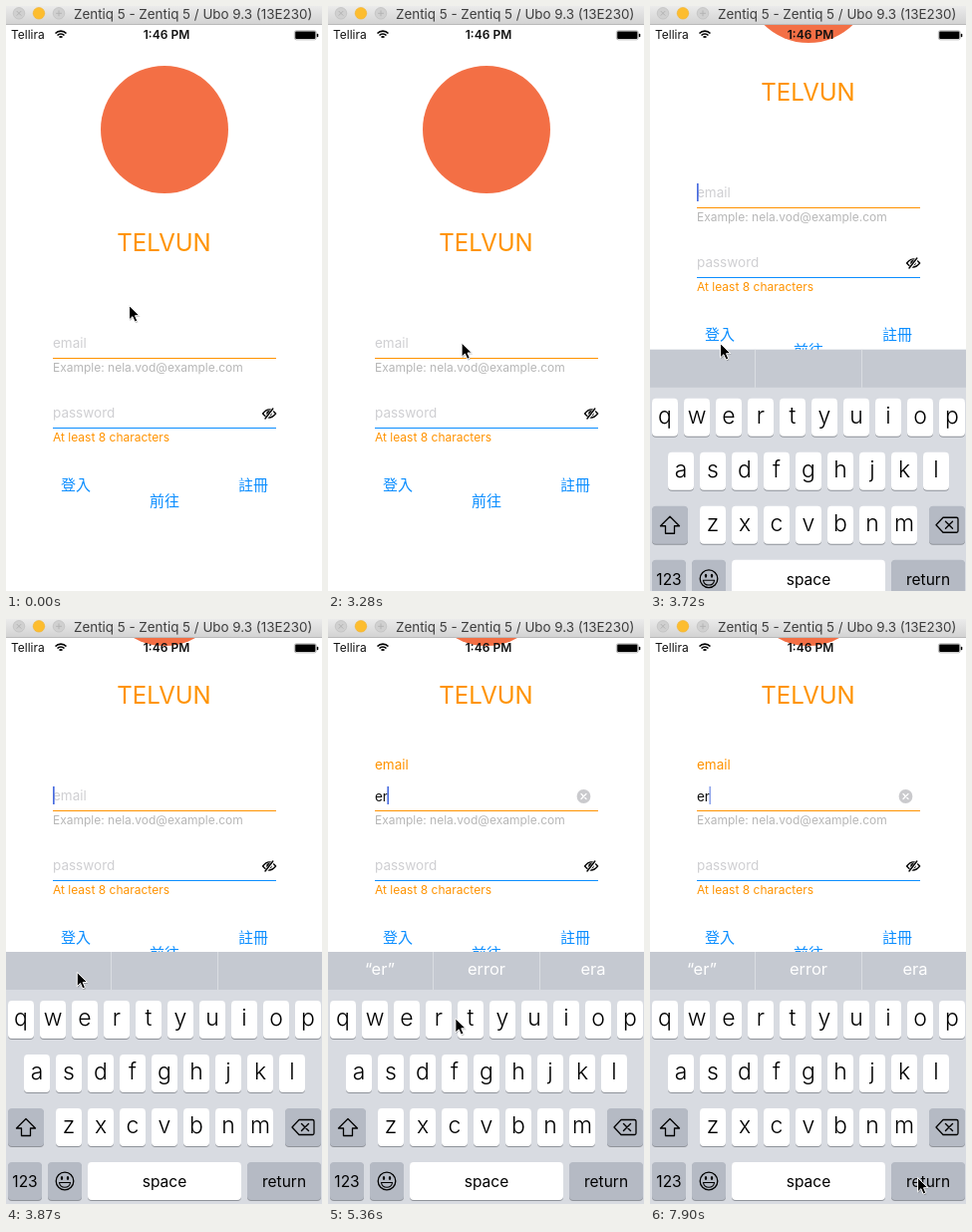
An HTML page that plays this animation: 317 px wide and 587 px high, repeating every 8000 ms.

```html
<!DOCTYPE html>
<html lang="en">
<head>
<meta charset="utf-8">
<title>Login form</title>
<style>
  html, body { margin: 0; width: 100%; height: 100%; overflow: hidden; background: #fff; }
  svg { display: block; width: 317px; height: 587px; }
  text { font-family: Inter, Roboto, sans-serif; white-space: pre; }
  .cjk { font-family: "Noto Sans CJK TC", "Noto Sans CJK JP", "Noto Sans CJK", sans-serif; }
</style>
</head>
<body>
<svg viewBox="0 0 317 587" xmlns="http://www.w3.org/2000/svg">
  <defs>
    <linearGradient id="shade" x2="0" y2="1">
      <stop stop-color="#ebebeb"/><stop offset="1" stop-color="#d3d3d3"/>
    </linearGradient>
  </defs>
  <rect width="317" height="587" fill="#fff"/>
  <g id="page"></g>
  <g id="status"></g>
  <g id="keyboard"></g>
  <g id="titlebar"></g>
  <g id="cursor">
    <path d="M.8 1V15.2L4.2 12L6.6 17.3L9 16.2L6.7 11.1H11.2Z" opacity=".22" transform="translate(.5 1)"/>
    <path d="M.6 .6V14.9L3.9 11.7L6.2 17L8.8 15.9L6.5 10.7H10.9Z" stroke="#fff"/>
  </g>
</svg>
<script>
const ORANGE = '#ff9300', BLUE = '#0c8eff', HINT = '#cfcfd2', GREY = '#b5bac4';
const $ = id => document.getElementById(id);

function add(parent, tag, attrs, text) {
  const el = document.createElementNS('http://www.w3.org/2000/svg', tag);
  for (const k in attrs) el.setAttribute(k, attrs[k]);
  if (text !== undefined) el.textContent = text;
  parent.appendChild(el);
  return el;
}
const label = (parent, x, y, size, fill, text, more) =>
  add(parent, 'text', { x, y, 'font-size': size, fill, ...more }, text);
const rect = (parent, x, y, width, height, fill, more) =>
  add(parent, 'rect', { x, y, width, height, fill, ...more });
const circle = (parent, cx, cy, r, fill, more) =>
  add(parent, 'circle', { cx, cy, r, fill, ...more });
const path = (parent, d, width = 1.3, more) =>
  add(parent, 'path', { d, fill: 'none', stroke: '#000', 'stroke-width': width, 'stroke-linejoin': 'round', 'stroke-linecap': 'round', ...more });
const cross = (parent, x, y, r, width, stroke) =>
  path(parent, `M${x - r} ${y - r}l${2 * r} ${2 * r}m0 ${-2 * r}l${-2 * r} ${2 * r}`, width, { stroke });
const mid = { 'text-anchor': 'middle' };

// Login page
const page = $('page');
circle(page, 159, 124, 64, '#f36f45');
label(page, 158.5, 246, 24, ORANGE, 'TELVUN', mid);

function field(y, hint, note, noteColor, lineColor) {
  rect(page, 47, y + 10, 224, 1, lineColor);
  label(page, 47, y + 24, 12, noteColor, note);
  return label(page, 47, y, 13.5, HINT, hint);
}
const hint = field(343, 'email', 'Example: nela.vod@example.com', '#b7b7b7', ORANGE);
field(413, 'password', 'At least 8 characters', ORANGE, BLUE);
const typed = label(page, 47, 343.5, 13.5, '#111', '');
const caret = rect(page, 47, 329, 1.7, 18, '#4a6de0');

const filled = add(page, 'g');
label(filled, 47, 312, 13.5, ORANGE, 'email');
circle(filled, 256.5, 339, 6.9, '#cacacd');
cross(filled, 256.5, 339, 2.5, 1.3, '#fff');

path(page, 'M257.6 409Q264 400.8 270.6 409Q264 417 257.6 409Z', 1.4);
circle(page, 264, 408.8, 2.7, '#000');
path(page, 'M260.4 414.2L268.4 403.8', 3, { stroke: '#fff' });
path(page, 'M260 414L267.8 404', 1.4);

const link = (x, y, text) => label(page, x, y, 15, BLUE, text, { class: 'cjk' });
link(55, 486, '登入');
link(233, 486, '註冊');
link(144, 502, '前往');

// Status bar
const status = $('status');
label(status, 5, 33.2, 12, '#111', 'Tellira');
for (const r of [7.4, 4.7, 2]) {
  const w = r * .74;
  path(status, `M${55 - w} ${33 - w}A${r} ${r} 0 0 1 ${55 + w} ${33 - w}`, 1.6, { 'stroke-linecap': 'butt' });
}
label(status, 161, 33.4, 12, '#111', '1:46 PM', { ...mid, 'font-weight': 600 });
rect(status, 289.4, 24.8, 21.8, 9, '#fff', { rx: 1.8, stroke: '#888', 'stroke-width': .6 });
rect(status, 290.2, 25.6, 20.2, 7.4, '#000', { rx: 1 });
rect(status, 311.8, 27.8, 1.5, 3.4, '#000', { rx: .7 });

// Keyboard
const board = $('keyboard');
rect(board, 0, 334, 317, 253, '#d8dbe1');
rect(board, 0, 334, 317, 38, '#c5c9d1');
for (const x of [105, 212]) rect(board, x, 334, 1, 38, '#dadde2');
const words = [52, 159, 266].map(x => label(board, x, 357, 16.5, '#fff', '', mid));

function key(x, row, w, text, fill = '#fff', more = { 'font-size': 15.5 }) {
  const y = 383 + row * 54;
  rect(board, x, y + 1, w, 38, '#8f939a', { rx: 4 });
  rect(board, x, y, w, 38, fill, { rx: 4 });
  label(board, x + w / 2, y + 25, 23, '#000', text, { ...mid, ...more });
}
['qwertyuiop', 'asdfghjkl', 'zxcvbnm'].forEach((letters, row) =>
  [...letters].forEach((c, i) =>
    key(162 + (i - letters.length / 2) * 32, row, 26, c, '#fff', { 'font-weight': 300 })));
key(2, 2, 36, '', GREY);
key(280, 2, 36, '', GREY);
key(2, 3, 34, '123', GREY);
key(42, 3, 34, '', GREY);
key(82, 3, 154, 'space');
key(242, 3, 74, 'return', GREY);
path(board, 'M20 501.5L10.5 511H15.5V518.5H24.5V511H29.5Z');
path(board, 'M287 510L294 502.5H307.5Q309 502.5 309 504V516Q309 517.5 307.5 517.5H294Z');
cross(board, 300, 510, 3.5, 1.4, '#000');
circle(board, 59, 564, 8.8, 'none', { stroke: '#000', 'stroke-width': 1.3 });
for (const cx of [56, 62]) add(board, 'ellipse', { cx, cy: 561, rx: 1.2, ry: 1.9 });
path(board, 'M53.4 565.5H64.6Q63.6 570.3 59 570.3Q54.4 570.3 53.4 565.5Z', 1.1);

// Window title bar
const bar = $('titlebar');
rect(bar, 0, 0, 317, 18, 'url(#shade)');
rect(bar, 0, 18, 317, 1, '#b9b9b9');
for (const x of [13, 33, 53]) circle(bar, x, 7.3, 5.8, x === 33 ? '#fdbd2f' : '#d0d0d0', { stroke: x === 33 ? '#f0b02e' : '#bababa', 'stroke-width': .6 });
cross(bar, 13, 7.3, 2, 1, '#b4b4b4');
path(bar, 'M50.5 7.3h5m-2.5 -2.5v5', 1, { stroke: '#b4b4b4' });
label(bar, 68, 13, 13.4, '#3d3d3d', 'Zentiq 5 - Zentiq 5 / Ubo 9.3 (13E230)');

// The screen refreshes once per tick; events below are in ticks
const LOOP = 8000, TICK = 148.8, LEAD = 8;
const TAP = 23, RISE = 2.52, KEY_E = 33, KEY_R = 36, IDLE = 40;
const GUESSES = [['', '', ''], ['“e”', 'email', 'even'], ['“er”', 'error', 'era']];

// Pointer glides: first tick, last tick, end x, end y, sideways bend
const GLIDES = [
  [2, 5, 145, 517, 52], [6, 11, 165, 337, 82], [21, 25, 70, 338, 0],
  [25, 30, 90, 397, -12], [33, 39, 150, 402, 0], [43, 51, 268, 560, 0]
];
const clamp = v => Math.min(1, Math.max(0, v));

function pointer(n) {
  let x = 123, y = 300;
  for (const [from, to, endX, endY, bend] of GLIDES) {
    const u = 1 - (1 - clamp((n - from) / (to - from))) ** 1.4;
    x += (endX - x) * u + 2 * u * (1 - u) * bend;
    y += (endY - y) * u;
  }
  return [x, y];
}

function blink(n) {
  if (n <= TAP) return 0;
  if (n >= KEY_E && n < IDLE) return 1;
  const phase = n * TICK % 1000;
  return phase < 390 ? 0 : phase < 500 || phase > 880 ? .6 : 1;
}

const move = (el, x, y) => el.setAttribute('transform', `translate(${x} ${y})`);
const fade = (el, alpha) => el.setAttribute('opacity', alpha);

function draw(time) {
  const n = Math.floor((time + LEAD) / TICK);
  const rest = 1 - clamp((n - TAP) / RISE);
  const count = (n >= KEY_E) + (n >= KEY_R);

  move($('cursor'), ...pointer(n));
  move(page, 0, -161 * (1 - rest ** 1.76));
  move(board, 0, 253 * rest ** 2);

  typed.textContent = 'er'.slice(0, count);
  fade(hint, count ? 0 : 1);
  fade(filled, count ? 1 : 0);
  fade(caret, blink(n));
  caret.setAttribute('x', 47 + 6.2 * count);
  words.forEach((w, i) => { w.textContent = GUESSES[count][i]; });
}

const start = performance.now();
function tick() {
  draw((performance.now() - start) % LOOP);
  requestAnimationFrame(tick);
}
tick();
</script>
</body>
</html>
```
